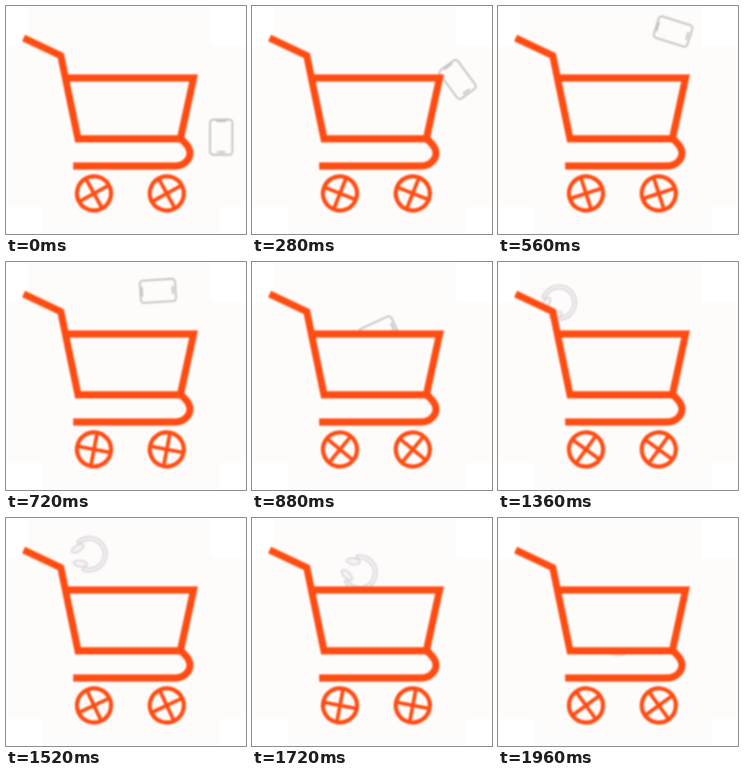
An HTML page with a canvas for the animation above (2 s loop, 300 by 285 pixels).

```html
<!DOCTYPE html>
<html lang="en">
<head>
<meta charset="utf-8">
<title>Shopping cart</title>
<style>
  html, body { margin: 0; width: 100%; height: 100%; overflow: hidden; background: #fff; }
  canvas { display: block; width: 300px; height: 285px; filter: blur(1px); }
</style>
</head>
<body>
<canvas id="stage" width="300" height="285"></canvas>
<script>
const ctx = document.getElementById('stage').getContext('2d');
const LOOP = 2000, STEP = 40, TOSS = LOOP / 2;
const ORANGE = '#ff4c12', PAPER = '#fefcfb';
const SPIN = 0.18;   // wheels and headphones, degrees per ms
const TUMBLE = 0.13; // phone, degrees per ms
const rad = d => d * Math.PI / 180;

// Each item is tossed along one cubic curve
const phoneArc = [[269, 164], [275, 105], [200, -111], [135, 169]];
const headphoneArc = [[31, 122], [48, 28], [160, -6], [150, 170]];

function along([a, b, c, d], u) {
  const v = 1 - u;
  return [0, 1].map(k =>
    v ** 3 * a[k] + 3 * v * v * u * b[k] + 3 * v * u * u * c[k] + u ** 3 * d[k]);
}

function placed(x, y, deg, draw) {
  ctx.save();
  ctx.translate(x, y);
  ctx.rotate(rad(deg));
  draw();
  ctx.restore();
}

function line(...points) {
  ctx.beginPath();
  points.forEach(p => ctx.lineTo(...p));
  ctx.stroke();
}

function pen(color, width) {
  ctx.strokeStyle = color;
  ctx.lineWidth = width;
}

function backdrop() {
  ctx.fillStyle = '#fff';
  ctx.fillRect(0, 0, 300, 285);
  ctx.fillStyle = PAPER;
  ctx.fillRect(27, 0, 228, 50);
  ctx.fillRect(0, 50, 300, 201);
  ctx.fillRect(45, 251, 222, 34);
}

function phone() {
  pen('#c4c3c3', 2.3);
  ctx.beginPath();
  ctx.roundRect(-14, -22, 28, 44, 4);
  ctx.stroke();
  line([-6, -20], [6, -20]);
  line([-5, 18.5], [5, 18.5]);
}

function headphones() {
  pen('#d6d4d6', 1.7);
  ctx.fillStyle = '#f5f3f4';
  ctx.beginPath();
  ctx.arc(0, 0, 22, rad(145), rad(35));
  ctx.arc(0, 0, 17.5, rad(35), rad(145), true);
  ctx.closePath();
  ctx.fill();
  ctx.stroke();
  for (const side of [-1, 1]) {
    placed(side * 9.5, 13, side * 18, () => {
      ctx.beginPath();
      ctx.ellipse(0, 0, 4, 8.5, 0, 0, Math.PI * 2);
      ctx.fill();
      ctx.stroke();
    });
  }
}

function cart() {
  // The basket hides whatever falls into it
  ctx.fillStyle = PAPER;
  ctx.beginPath();
  [[76, 90], [234.5, 90], [218, 166], [90, 166]].forEach(p => ctx.lineTo(...p));
  ctx.fill();

  pen(ORANGE, 8.8);
  line([22, 40], [68.5, 62], [90, 166], [218, 166], [234.5, 90], [75, 90]);
  ctx.beginPath();
  ctx.moveTo(217, 165);
  ctx.bezierCurveTo(223, 169, 230, 177, 230, 184);
  ctx.bezierCurveTo(230, 192, 222, 200, 212, 200);
  ctx.lineTo(84, 200);
  ctx.stroke();
}

function wheel() {
  pen(ORANGE, 5.2);
  ctx.beginPath();
  ctx.arc(0, 0, 21.3, 0, Math.PI * 2);
  ctx.stroke();
  pen(ORANGE, 4.6);
  line([-20, 0], [20, 0]);
  line([0, -20], [0, 20]);
}

function render(t) {
  const u = t % TOSS / TOSS;
  backdrop();
  if (t < TOSS) placed(...along(phoneArc, u), -TUMBLE * t, phone);
  else placed(...along(headphoneArc, u), SPIN * (t - 1080), headphones);
  cart();
  for (const x of [110, 201]) placed(x, 234.3, 61.2 + SPIN * t, wheel);
}

const start = performance.now();
function tick() {
  const t = (performance.now() - start) % LOOP;
  render(Math.floor(t / STEP) * STEP);
  requestAnimationFrame(tick);
}
tick();
</script>
</body>
</html>
```
